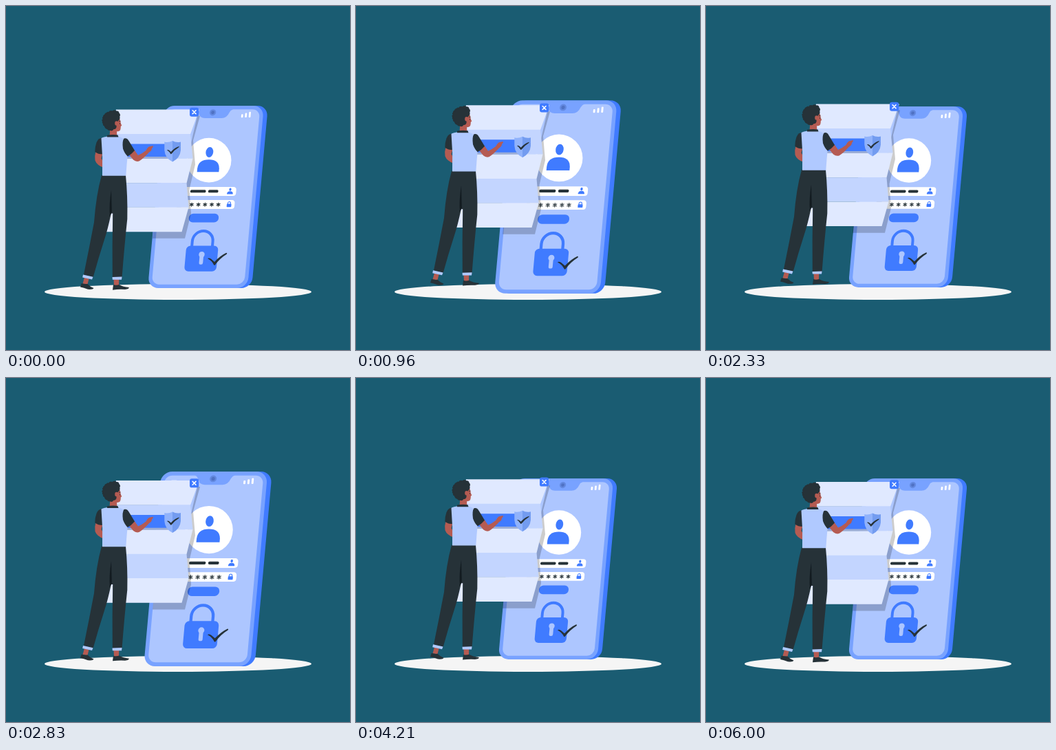
Recreate the animation shown at these times as an HTML page. Size 500x500 px, loop 6.04 s.

```html
<!DOCTYPE html>
<html lang="en">
<head>
<meta charset="utf-8">
<title>Secure login</title>
<style>
  html, body { margin: 0; width: 100%; height: 100%; overflow: hidden; background: #1a5c72; }
  svg { display: block; width: 100%; height: 100%; }
  .blue { fill: #407bff; }
  .frame { fill: #78a2ff; }
  .screen { fill: #adc6ff; }
  .dark { fill: #263238; }
  .skin { fill: #b55b52; }
  .white { fill: #fff; }
  .cloth { fill: #b0c9ff; }
  .light { fill: #e0e9ff; }
  .fold { fill: #c3d5ff; }
  .line { fill: none; stroke-linecap: round; stroke-linejoin: round; }
</style>
</head>
<body>
<svg viewBox="0 0 500 500">
  <defs>
    <path id="star" class="line" stroke="#263238" stroke-width="1.2" d="M0-2.5V2.5M-2.3-1.3 2.3 1.3M-2.3 1.3 2.3-1.3"/>
  </defs>
  <ellipse cx="250" cy="415.5" rx="194" ry="11.5" fill="#f5f5f5"/>

  <g id="phone">
    <g transform="matrix(1 0 -.09 1 24.98 0)">
      <rect class="blue" x="225" y="146" width="143.5" height="263" rx="15"/>
      <rect class="frame" x="218.5" y="146" width="144" height="263" rx="15"/>
      <rect class="screen" x="223.7" y="151.2" width="133.6" height="252.6" rx="10.5"/>
      <path class="frame" d="M264 150.5H319Q315 152 313.500 155.500Q310.500 163.700 303 163.700H279Q271 163.700 269 155.500Q268 152 264 150.500Z"/>
      <circle cx="289.6" cy="155.6" r="4.600" fill="#6389e0"/>
      <circle cx="289.6" cy="155.6" r="2.400" fill="#5072c4"/>
      <g class="white">
        <rect x="331" y="158" width="2.700" height="5" rx="1"/>
        <rect x="336.400" y="156.400" width="2.700" height="6.500" rx="1"/>
        <rect x="341.900" y="154.700" width="2.700" height="8" rx="1"/>
        <rect x="233" y="157.500" width="8" height="4" rx="1" opacity=".6"/>
        <rect x="254" y="263.200" width="79.500" height="12.800" rx="4"/>
        <rect x="256" y="282" width="77" height="12.800" rx="4"/>
      </g>
      <g class="dark">
        <rect x="267.300" y="267.400" width="22.500" height="4" rx="1.600"/>
        <rect x="293.200" y="267.400" width="14.500" height="4" rx="1.600"/>
      </g>
      <use href="#star" x="271" y="288.600"/>
      <use href="#star" x="280.700" y="288.600"/>
      <use href="#star" x="290.300" y="288.600"/>
      <use href="#star" x="300" y="288.600"/>
      <use href="#star" x="309.500" y="288.600"/>
      <g class="blue">
        <ellipse cx="324.800" cy="266.700" rx="1.600" ry="2.100"/>
        <path d="M320.500 273.500V272.500Q321 269.300 324.800 269.300Q328.700 269.300 329 272.500V273.500Z"/>
        <rect x="321.700" y="287.500" width="6.600" height="4.600" rx=".8"/>
        <rect x="268.700" y="301.600" width="43" height="12.600" rx="6"/>
        <rect x="268.800" y="348" width="46.200" height="37" rx="6"/>
      </g>
      <path class="line" stroke="#407bff" stroke-width="1" d="M323 288V286.500A2 2 0 0 1 327 286.500V288"/>
      <path class="line" stroke="#407bff" stroke-width="4" d="M276.700 350V341.500A14.800 14.800 0 0 1 306.300 341.500V350"/>
      <circle class="screen" cx="292" cy="360.600" r="4.200"/>
      <rect class="screen" x="289.200" y="361" width="5.600" height="14" rx="2.500"/>
    </g>
    <circle class="white" cx="295" cy="224.500" r="32.200"/>
    <g class="blue" transform="matrix(1 0 -.09 1 24.98 0)">
      <ellipse cx="290" cy="213" rx="5.400" ry="7.400"/>
      <path d="M274.500 241.500V236.500Q275 223.500 290 223.500Q305 223.500 306 236.500V241.500Z"/>
    </g>
    <path class="dark" d="M293 366.500Q294.500 365 298 367L303 371.300Q311 362.500 320 358.300Q321.800 358.300 320.500 360.200Q311 366 303.700 375.800Q302.800 376.600 302 375.500Q299 369.500 293 366.500Z"/>
  </g>

  <g id="floating">
    <path opacity=".2" d="M278 160H282L272 196 275 231 266.500 267 269 302 260 338.400H213L214 328H240Z"/>
    <path class="light" d="M160 151H281L268 186.700H152Z"/>
    <path class="fold" d="M152 186.500H268L271.500 222.400H155Z"/>
    <path class="light" d="M155 222.200H271.500L262.500 258H147Z"/>
    <path class="fold" d="M147 257.800H262.500L265.500 293.200H149Z"/>
    <path class="light" d="M149 293H265.500L255.500 328.700H140Z"/>
    <path fill="#9badd6" d="M172 217H238V222.600H172Z"/>
    <path class="blue" d="M172 201H240V219.600H172Z"/>
    <path fill="#90b2fb" d="M242 196.500Q236.500 199.500 230.300 198V210Q231 221.500 242 227Z"/>
    <path fill="#739cf0" d="M242 196.500Q247.500 199.500 254 198V210Q253 221.500 242 227Z"/>
    <path class="dark" d="M234 210Q236 208.500 239.700 212.500Q245 206.500 251.500 204.500Q252 205.300 251 206Q245 209.500 240.700 215.300Q239.800 216.300 239 215.200Q237 211.500 234 210Z"/>
    <rect class="blue" x="267" y="148.300" width="13.200" height="13" rx="3.200"/>
    <path class="line" stroke="#fff" stroke-width="1.600" d="M271.200 152.300 276 157.200M276 152.300 271.200 157.200"/>

    <g id="man">
      <path class="skin" d="M114 395 120.500 397 118.500 405 111.500 404ZM156.500 397H164.300L164 407H157Z"/>
      <path class="dark" d="M109.800 403.500Q113 405 118.500 404.500Q122 408.500 127.500 410.500Q126.500 413 119 412.300Q113 410 108 409Z"/>
      <path class="dark" d="M156 405.600Q160 407 164.500 405.500Q170 409 178.800 409.600Q179 412 173 412.600Q164 412 155 413.300Z"/>
      <path class="dark" d="M139 246.500H174Q177 277 176.300 310Q172 350 168.500 395.500L154.800 395.300Q154.300 350 155.200 302L152.800 302Q148 325 143 340Q134 368 126.700 394.500L113 391Q121 352 128 315Q131 275 139 246.500Z"/>
      <path d="M153 268 153.800 300 151 306Q149.500 290 153 268Z" fill="#121b20"/>
      <path class="cloth" d="M112 391 126.500 394.200 125 398 111.200 395ZM154.500 394.500 168.600 394 168 398.200H154.800Z"/>

      <path class="skin" d="M130.500 212 140.500 214.500 138.500 222 142 228V235.500Q132 232 129.500 225Q128.500 218 130.500 212Z"/>
      <path class="dark" d="M141 192Q134 192 131.500 199Q129 206 129.300 212.500Q134 216 140.500 216Z"/>
      <path class="skin" d="M151.500 177H161L161.300 190H150.500Z"/>
      <path class="cloth" d="M138.500 192.500Q143 190 150 190H162Q169 191 174 196L177 215Q175.500 230 174.300 247.300H140Q141 220 138.500 192.500Z"/>
      <path class="dark" d="M147 188.300Q155 187 162.500 188L163.500 191H147Z"/>
      <path class="skin" d="M178.500 216 186.500 209.500 192 217.500Q198 215 203.500 210.500Q206 205 209.500 204.500L213.800 203.700Q214.500 205.500 212 207.500Q211.800 211 208 213Q200 222 193.500 226Q189 227.500 185 224Z"/>
      <path class="dark" d="M171.500 193Q176 191.500 178.800 197L187 210.500Q182 216.500 176.800 219Q172.500 215 170 208Q168.500 197 171.500 193Z"/>

      <path class="skin" d="M156 165H165.500Q166.700 168 166.800 171L168.300 174.300 166.800 175.500Q167 181 164.500 182.300Q160 184 156 181Z"/>
      <path class="dark" d="M143 158.500Q145 154.500 149 155Q151 151.500 154.500 153Q158 150.500 160.500 153Q164 152.500 164.500 156Q167 158.500 165.300 161Q166.200 164.500 164 166.500L162.500 168Q160.500 170 160.500 177Q159.500 180 156.500 179.500Q155 183 151.500 181.500Q148 182 147 179.500Q143.500 179 143.500 175.500Q140 174 141 170.500Q138.500 167 141 164.500Q140 160.500 143 158.500Z"/>
      <circle class="line" cx="153" cy="166.800" r="12.300" stroke="#263238" stroke-width="2.600" stroke-dasharray=".1 3.300" pathLength="77" transform="rotate(70 153 166.800)" id="curls"/>
      <ellipse class="skin" cx="160.500" cy="171" rx="2.300" ry="3.200"/>
      <path class="line" stroke="#263238" stroke-width=".8" d="M164.300 168.300 166 168M165.500 171V172"/>
    </g>
  </g>
</svg>
<script>
  const LOOP = 6040, LEAD = 40;
  const phone = document.getElementById('phone');
  const floating = document.getElementById('floating');
  // Two linear heartbeats: [share of the loop, scale]
  const beats = [[0, 1], [.1, 1.1], [.3, 1], [.4, 1], [.5, 1.1], [.6, 1], [1, 1]];

  // Curls follow only the back and top of the head
  const curls = document.getElementById('curls');
  const visible = Array(16).fill('.1 3.3').join(' ');
  curls.setAttribute('stroke-dasharray', visible + ' 0 100');

  function scaleAt(p) {
    const i = beats.findIndex(b => b[0] > p);
    const [p0, s0] = beats[i - 1], [p1, s1] = beats[i];
    return s0 + (s1 - s0) * (p - p0) / (p1 - p0);
  }

  function draw(now) {
    const p = (now + LEAD) % LOOP / LOOP;
    const lift = 10 * (1 - Math.abs(1 - 2 * (p * 4 % 1)));
    phone.setAttribute('transform',
      `translate(293.5 277.5) scale(${scaleAt(p)}) translate(-293.5 -277.5)`);
    floating.setAttribute('transform', `translate(0 ${-lift})`);
  }

  const start = performance.now();
  function tick() {
    draw(performance.now() - start);
    requestAnimationFrame(tick);
  }
  tick();
</script>
</body>
</html>
```
